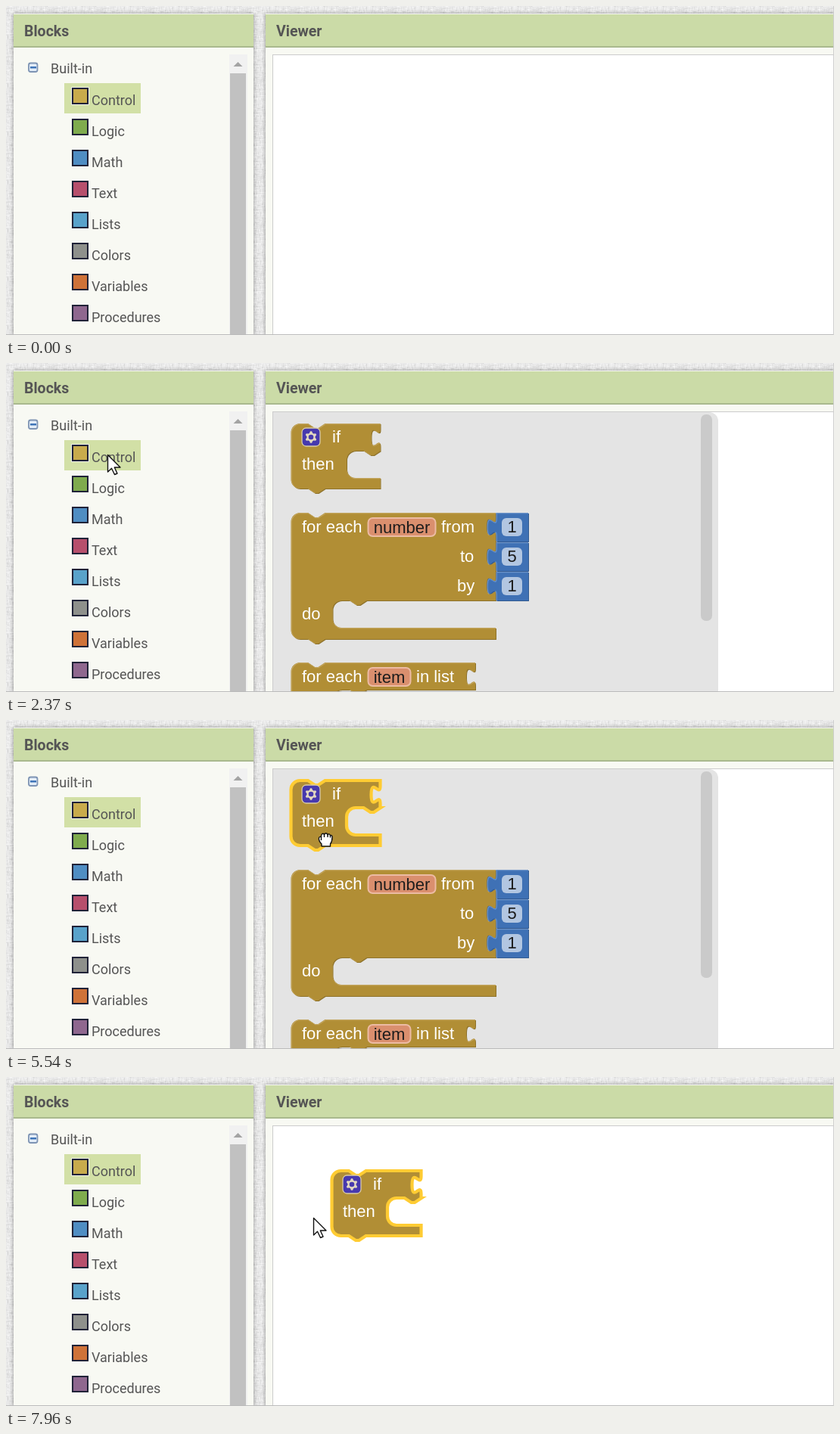
Animation of 1094x435 px, one loop 8 s. Source, as an HTML page with a canvas:

```html
<!DOCTYPE html>
<html lang="en">
<head>
<meta charset="utf-8">
<title>Block editor</title>
<style>
html, body { margin: 0; width: 100%; height: 100%; overflow: hidden; }
canvas { display: block; }
</style>
</head>
<body>
<canvas id="stage" width="1094" height="435"></canvas>
<script>
const W = 1094, H = 435, LOOP = 8000;
const ctx = document.getElementById('stage').getContext('2d');
const UI = 'Roboto, sans-serif', BLOCK = '"Liberation Sans", Arial, sans-serif';
const GOLD = '#b18e35', BLUE = '#3f71b5';
const GRAB = [399, 148];

const categories = [
  ['Control', '#c8ab4c'], ['Logic', '#7fab4e'], ['Math', '#4f8dc3'], ['Text', '#b74f6d'],
  ['Lists', '#59a2cb'], ['Colors', '#8e908c'], ['Variables', '#cf7239'], ['Procedures', '#8f678f']
];

// Pointer moves: start, end, number of steps, easing, way points
const linear = p => p;
const easeOut = p => 1 - (1 - p) ** 2;
const easeInOut = p => p * p * (3 - 2 * p);
const moves = [
  [90, 350, 5, easeOut, [[1164, 450], [310, 385]]],
  [580, 1360, 11, easeInOut, [[310, 385], [134, 121]]],
  [3150, 3690, 8, easeInOut, [[134, 121], [398, 147]]],
  [3840, 3840, 1, linear, [GRAB, GRAB]],
  [5400, 5540, 3, linear, [GRAB, [422, 158]]],
  [5630, 6170, 8, easeOut, [[422, 158], [451, 190]]],
  [6230, 6320, 2, linear, [[451, 190], [453, 192]]],
  [7250, 7960, 10, linear, [[453, 192], [455, 258], [406, 186]]]
];

function pointerAt(t) {
  const move = moves.filter(m => t >= m[0]).pop();
  if (!move) return null;
  const [start, end, steps, ease, points] = move;
  const done = t >= end ? steps : 1 + Math.floor((t - start) / (end - start) * (steps - 1));
  const p = ease(done / steps) * (points.length - 1);
  const i = Math.min(Math.floor(p), points.length - 2);
  return [0, 1].map(k => Math.round(points[i][k] + (points[i + 1][k] - points[i][k]) * (p - i)));
}

function rect(x, y, w, h, fill) {
  ctx.fillStyle = fill;
  ctx.fillRect(x, y, w, h);
}

function rounded(x, y, w, h, r, fill, stroke, width = 1) {
  ctx.beginPath();
  ctx.roundRect(x, y, w, h, r);
  if (fill) { ctx.fillStyle = fill; ctx.fill(); }
  if (stroke) { ctx.strokeStyle = stroke; ctx.lineWidth = width; ctx.stroke(); }
}

function label(text, x, y, font, color, align = 'left') {
  ctx.font = font;
  ctx.fillStyle = color;
  ctx.textAlign = align;
  ctx.fillText(text, x, y);
}

const blockText = (text, x, y) => label(text, x, y, '22px ' + BLOCK, '#fff');

function makeLinen() {
  const tile = document.createElement('canvas');
  tile.width = tile.height = 64;
  const c = tile.getContext('2d');
  let seed = 7;
  const random = () => (seed = seed * 16807 % 2147483647) / 2147483647;
  c.fillStyle = '#e9e9e9';
  c.fillRect(0, 0, 64, 64);
  for (let i = 0; i < 900; i++) {
    c.fillStyle = random() < .5 ? 'rgba(255,255,255,.3)' : 'rgba(0,0,0,.03)';
    const length = 2 + random() * 6, x = Math.floor(random() * 64), y = Math.floor(random() * 64);
    if (i % 2) c.fillRect(x, y, length, 1); else c.fillRect(x, y, 1, length);
  }
  return ctx.createPattern(tile, 'repeat');
}
const linen = makeLinen();

function panel(x, w, title) {
  ctx.save();
  ctx.shadowColor = 'rgba(0,0,0,.4)';
  ctx.shadowBlur = 5;
  rect(x, 10, w, H, '#f8f9f3');
  ctx.restore();
  rect(x, 11, w, 43, '#cbdba7');
  rect(x, 53, w, 2, '#a9b98e');
  label(title, x + 14, 40, 'bold 19.5px ' + UI, '#555');
}

function drawSidebar(hoverThumb) {
  panel(10, 317, 'Blocks');
  rounded(30, 75.5, 11.5, 11.5, 2.5, '#e3edf8', '#7d93b3', 1.8);
  rect(32, 80, 8, 2.5, '#3f75b8');
  label('Built-in', 59, 89, '18px ' + UI, '#555');
  rect(77, 102, 101, 40, '#d2e0a6');
  categories.forEach(([name, color], i) => {
    const y = 109 + i * 41;
    if (!i) rect(86, y - 2, 24, 24, '#eef0ea');
    rect(87, y - 1, 22, 22, '#202238');
    rect(89, y + 1, 18, 18, color);
    label(name, 113, y + 22, '18px ' + UI, '#555');
  });
  rect(295, 64, 24, H, '#f1f1f1');
  rect(296, 89, 21, H, hoverThumb ? '#a8a8a8' : '#c1c1c1');
  ctx.fillStyle = '#a3a3a3';
  ctx.fill(new Path2D('M300.5 80L306.5 74L312.5 80Z'));
}

function drawViewer() {
  panel(343, 800, 'Viewer');
  rect(352, 64, 800, H, '#ccc');
  rect(353, 65, 800, H, '#fff');
}

const CORNER = 'a12 12 0 0 1 ', INNER = 'a12 12 0 0 0 ', NOTCH = 'l-9 6h-4.5l-9 -6';
const SOCKET = 'c0 15 -12 -12 -12 11.25s12 -3.75 12 11.25';

function loopPath(x, y, right, sockets, armX, armY, bottom) {
  const holes = sockets.map(s => `V${s + 7.5}${SOCKET}`).join('');
  return new Path2D(`M${x} ${y + 12}${CORNER}12 -12H${x + 22.5}l9 6h4.5l9 -6H${right}${holes}` +
    `V${armY}H${armX + 45}${NOTCH}h-10.5${INNER}-12 12v12${INNER}12 12H${right}` +
    `V${bottom}H${x + 45}${NOTCH}H${x + 12}${CORNER}-12 -12Z`);
}

const ifPath = loopPath(376.5, 80, 494.5, [80], 450, 116, 166);
const rangePath = loopPath(376.5, 198, 647, [198, 237, 276], 431.5, 314, 350 + 15);
const listPath = loopPath(376.5, 396, 620, [396], 431.5, 432, 483);

function bevelled(path, color, dark, light) {
  ctx.save();
  ctx.translate(1, 1);
  ctx.fillStyle = dark;
  ctx.fill(path);
  ctx.translate(-1, -1);
  ctx.fillStyle = color;
  ctx.fill(path);
  ctx.clip(path);
  ctx.translate(.7, .7);
  ctx.strokeStyle = light;
  ctx.lineWidth = 1.3;
  ctx.stroke(path);
  ctx.restore();
}

const goldBlock = path => bevelled(path, GOLD, '#8e722a', '#c2a55e');

function gear(x, y) {
  rounded(x - 12, y - 12, 24, 24, 5.5, '#4739ae', '#d9cba6', 1.3);
  ctx.beginPath();
  for (let i = 0; i < 24; i++) {
    const a = (i - 1.5) / 24 * Math.PI * 2 - Math.PI / 2, r = i % 4 === 1 || i % 4 === 2 ? 7.8 : 5.6;
    ctx.lineTo(x + r * Math.cos(a), y + r * Math.sin(a));
  }
  ctx.closePath();
  ctx.fillStyle = '#e2d8c0';
  ctx.fill();
  ctx.beginPath();
  ctx.arc(x, y, 3.3, 0, 7);
  ctx.fillStyle = '#4739ae';
  ctx.fill();
}

function drawIf(dx, dy, selected, dragging) {
  ctx.save();
  ctx.translate(dx, dy);
  if (selected) {
    ctx.fillStyle = GOLD;
    ctx.fill(ifPath);
    ctx.strokeStyle = '#fc3';
    ctx.lineWidth = 4.2;
    ctx.stroke(ifPath);
  } else goldBlock(ifPath);
  gear(403, 98);
  blockText('if', 431, 105);
  blockText('then', 391, 141);
  if (dragging) rect(370, 74, 132, 104, 'rgba(255,255,255,.2)');
  ctx.restore();
}

function variable(name, x, y, w) {
  rounded(x + 1, y, w - 2, 24, 6, '#da8f6e', '#ecbba3', 2);
  label(name, x + w / 2, y + 19.5, '22px ' + BLOCK, '#1c1c1c', 'center');
}

function numberBlock(value, y) {
  const path = new Path2D(`M647.5 ${y}H690V${y + 38}H647.5V${y + 30}` +
    `c0 -15 -12 12 -12 -11.25s12 3.75 12 -11.25Z`);
  bevelled(path, BLUE, '#325a91', '#6c93c8');
  rounded(655, y + 7, 27, 24, 6, '#b2c6e1');
  label(value, 668.5, y + 26, '22px ' + BLOCK, '#1c1c1c', 'center');
}

function drawFlyout(ifSelected) {
  rounded(353, 65, 588, 400, [0, 12, 0, 0], '#e4e4e4');
  rounded(918, 68, 15, 273, 7, '#cacaca');
  drawIf(0, 0, ifSelected, false);

  goldBlock(rangePath);
  blockText('for each', 391, 224);
  variable('number', 477.5, 205, 91);
  blockText('from', 575, 224);
  blockText('to', 600, 263);
  blockText('by', 596, 302);
  blockText('do', 391, 339);
  ['1', '5', '1'].forEach((value, i) => numberBlock(value, 198 + i * 39));

  goldBlock(listPath);
  blockText('for each', 391, 422);
  variable('item', 477.5, 403, 58);
  blockText('in list', 542, 422);
}

function drawTooltip() {
  ctx.save();
  ctx.globalAlpha = .9;
  ctx.shadowColor = 'rgba(0,0,0,.18)';
  ctx.shadowBlur = 28;
  ctx.shadowOffsetX = ctx.shadowOffsetY = 6;
  rect(398, 165, 352, 28, '#ddd');
  ctx.shadowColor = 'transparent';
  rect(399.5, 166.5, 349, 25, '#ffffc7');
  label('If a value is true, then do some statements.', 402, 185, '18px ' + BLOCK, '#000');
  ctx.restore();
}

const arrowPath = new Path2D('M.5 .5V23L5.5 18.3L9.5 26.5L13 25L9.3 17H17Z');

function outlined(path, stroke = 1.4) {
  ctx.fillStyle = '#fff';
  ctx.fill(path);
  ctx.strokeStyle = '#111';
  ctx.lineWidth = stroke;
  ctx.lineJoin = 'round';
  ctx.stroke(path);
}

const openPalm = new Path2D('M-5 11C-6 7 -11 3 -11.5 0C-11 -3 -8 -2 -5.5 1.5L-8.5 -6' +
  'C-9 -9.5 -5.5 -10 -4.5 -7L-2.5 -2L-3.5 -9C-3 -12 0 -12 .5 -9L1.5 -2L2.5 -9' +
  'C3.5 -11.5 6.5 -11 6 -8L5.5 -1L8 -5.5C9.5 -7.5 12 -6 11 -3.5L8.5 4L6 11Z');
const closedPalm = new Path2D('M-5 9V6C-8 3 -9 1 -8.5 -2C-8 -4 -6 -4 -5.5 -3V-5' +
  'C-5 -8.5 -2 -8.5 -1.5 -6C-1 -9 2.5 -9 3 -6C4 -8 6 -7.5 6.5 -5C8 -6.5 9 -5 9 -3C9 2 8 4 6.5 6V9Z');
const knuckles = new Path2D('M-1.5 -6V-3M3 -6V-3M6.5 -5V-2.5M-5.5 -3V1');

function drawPointer([x, y], kind) {
  ctx.save();
  if (kind === 'arrow') {
    ctx.translate(x, y);
    outlined(arrowPath);
  } else if (kind === 'open') {
    ctx.translate(x + 1.5, y + 2.5);
    outlined(openPalm);
  } else {
    ctx.translate(x, y);
    outlined(closedPalm);
    ctx.stroke(knuckles);
  }
  ctx.restore();
}

function draw(t) {
  const pointer = pointerAt(t);
  const flyout = t >= 2370 && t < 5630;
  const placed = t >= 5630;
  const holding = t >= 5080 && t < 6860;
  const overFlyoutIf = flyout && pointer[0] > 376;
  const overPlacedIf = placed && pointer[0] > 430 && pointer[1] < 212;

  rect(0, 0, W, H, linen);
  drawSidebar(pointer && !flyout && !placed && pointer[0] >= 296 && pointer[0] < 317);
  drawViewer();
  if (flyout) drawFlyout(overFlyoutIf);
  if (placed) {
    const [x, y] = t < 6860 ? pointer : [453, 192];
    drawIf(x - GRAB[0], y - GRAB[1], true, t < 6860);
  }
  if (t >= 4470 && t < 5080) drawTooltip();
  if (pointer) drawPointer(pointer, holding ? 'closed' : overFlyoutIf || overPlacedIf ? 'open' : 'arrow');
  rect(0, H - 1, W, 1, '#bcbcbc');
  rect(W - 1, 0, 1, H, '#cfcfcf');
}

let begin;
function tick(now) {
  begin ??= now;
  draw((now - begin) % LOOP);
  requestAnimationFrame(tick);
}
draw(0);
requestAnimationFrame(tick);
</script>
</body>
</html>
```
